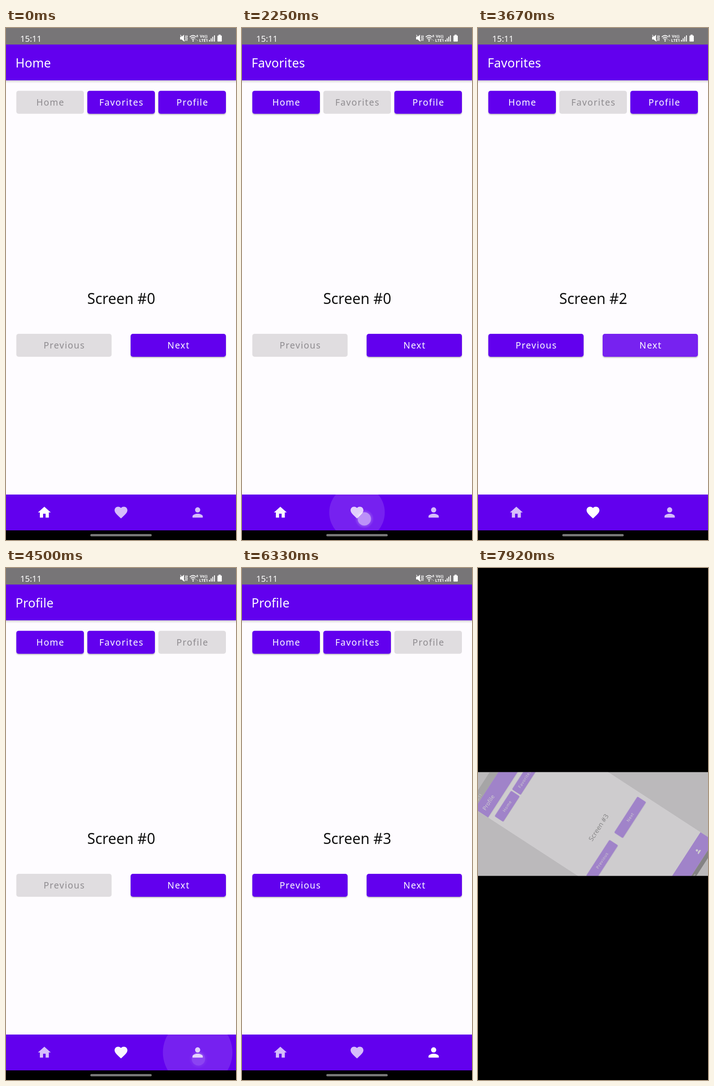
These frames come from a looping animation (502 px wide and 1115 px high, 8000 ms). An HTML page:

```html
<!DOCTYPE html>
<html lang="en">
<head>
<meta charset="utf-8">
<title>Tabs with nested screens</title>
<style>
  html, body { margin: 0; width: 100%; height: 100%; overflow: hidden; background: #000; }
  svg { display: block; width: 502px; height: 1115px; font-family: "Noto Sans", "Open Sans", sans-serif; }
  .btn rect { fill: #6200ee; filter: url(#lift); }
  .btn text { fill: #fff; font-size: 19.5px; letter-spacing: 1.55px; text-anchor: middle; }
  .btn.off rect { fill: #e0dde0; filter: none; }
  .btn.off text { fill: #8e8b8f; }
  .tiny { font-size: 8.6px; font-weight: 700; }
</style>
</head>
<body>
<svg viewBox="0 0 502 1115">
  <defs>
    <filter id="lift" x="-5%" y="-10%" width="110%" height="130%">
      <feDropShadow dx="0" dy="2" stdDeviation="1.3" flood-color="#000" flood-opacity=".25"/>
    </filter>
    <linearGradient id="shade" x2="0" y2="1">
      <stop stop-color="#000" stop-opacity=".17"/>
      <stop offset="1" stop-color="#000" stop-opacity="0"/>
    </linearGradient>
    <radialGradient id="glow">
      <stop offset=".6" stop-color="#fff" stop-opacity=".4"/>
      <stop offset="1" stop-color="#fff" stop-opacity="0"/>
    </radialGradient>
    <clipPath id="band"><rect y="444.5" width="502" height="226"/></clipPath>
    <clipPath id="bar"><rect y="1016" width="502" height="78"/></clipPath>
    <clipPath id="nextBox"><rect x="272" y="666" width="208" height="50" rx="5"/></clipPath>
    <clipPath id="page"><rect width="502" height="1115"/></clipPath>
  </defs>
  <rect id="back" width="502" height="1115"/>
  <g id="frame">
    <g id="phone" clip-path="url(#page)">
      <rect width="502" height="1115" fill="#fefcff"/>
      <rect y="114" width="502" height="6" fill="url(#shade)"/>
      <rect width="502" height="36.5" fill="#777577"/>
      <rect y="36" width="502" height="78" fill="#6200ee"/>
      <g fill="#fff">
        <text x="31" y="29.5" font-size="18.3">15:11</text>
        <path d="M380 19h3.5l5-4.5v15l-5-4.500h-3.500z"/>
        <path d="M380.500 15l9.500 14M391.500 16.500l1.500 2-1.500 2.500 1.500 2.500-1.500 2.500 1 2M394.500 16l1.500 2.500-1.500 2.500 1.500 2.500-1.500 2.500 1 2" fill="none" stroke="#fff" stroke-width="1.3"/>
        <path d="M401 19.500q7.500-6.500 14 0M403.500 22.500q5-4.500 9.500 0M405.800 25.300q2.500-2.300 4.900 0" fill="none" stroke="#fff" stroke-width="1.7"/>
        <circle cx="408.300" cy="28" r="1.500"/>
        <text x="415.500" y="19.500" font-size="7" font-weight="700">6</text>
        <path d="M413 26l1.500-2 1.500 2zM416.500 26.500l1.500 2 1.500-2z" opacity=".6"/>
        <text x="423" y="21" class="tiny">Vo))</text>
        <text x="421.500" y="30" class="tiny">LTE1</text>
        <path d="M443 26h2v3.500h-2zM446.700 22.500h2v7h-2zM450.300 19h2v10.500h-2zM454 16h2v13.500h-2z"/>
        <path d="M464 14.500h4.500v2h1.500q1 0 1 1v11q0 1-1 1h-7.500q-1 0-1-1v-11q0-1 1-1h1.500z"/>
        <text id="title" x="20.700" y="86" font-size="27" letter-spacing=".2"></text>
      </g>
      <g id="buttons"></g>
      <text id="count" x="251.500" y="601" font-size="32" text-anchor="middle" fill="#111"></text>
      <rect y="1016" width="502" height="78" fill="#6200ee"/>
      <g clip-path="url(#bar)"><circle id="navRipple" cy="1055" fill="#fff"/></g>
      <g id="icons" fill="#fff"></g>
      <rect y="1094" width="502" height="21"/>
      <rect x="184" y="1102" width="134" height="5" rx="2.500" fill="#777"/>
      <g id="touch">
        <circle r="21" fill="url(#glow)"/>
        <circle r="14.500" fill="#fff" opacity=".82"/>
      </g>
    </g>
  </g>
</svg>
<script>
const NS = "http://www.w3.org/2000/svg";
const $ = id => document.getElementById(id);
const set = (el, attrs) => { for (const k in attrs) el.setAttribute(k, attrs[k]); return el; };
const add = (parent, tag, attrs) => parent.appendChild(set(document.createElementNS(NS, tag), attrs));
const clamp = x => Math.min(1, Math.max(0, x));
const smooth = x => { x = clamp(x); return x * x * (3 - 2 * x); };
const mix = (a, b, p) => a + (b - a) * p;

const FPS = 12, LOOP = 8000;
const tabs = ["Home", "Favorites", "Profile"];
const tabX = [83.7, 251, 418.300];
const iconPaths = [
  "M10 20v-6h4v6h5v-8h3L12 3 2 12h3v8z",
  "M12 21.350l-1.450-1.320C5.400 15.360 2 12.280 2 8.500 2 5.420 4.420 3 7.500 3c1.740 0 3.410.81 4.500 2.090C13.090 3.810 14.760 3 16.500 3 19.580 3 22 5.420 22 8.500c0 3.780-3.400 6.860-8.550 11.540z",
  "M12 12c2.210 0 4-1.790 4-4s-1.790-4-4-4-4 1.790-4 4 1.790 4 4 4zm0 2c-2.670 0-8 1.340-8 4v2h16v-2c0-2.660-5.330-4-8-4z"
];

// Taps in ticks of 1/12 s; "tab" selects a tab, otherwise the Next button.
const taps = [
  { at: 14, x: 404, y: 702 },
  { at: 25, x: 267, y: 1069, tab: 1 },
  { at: 37, x: 406, y: 702 },
  { at: 40, x: 406, y: 702 },
  { at: 52, x: 420, y: 1069, tab: 2, lead: 0.7 },
  { at: 63, x: 406, y: 702 },
  { at: 66, x: 406, y: 702 },
  { at: 70, x: 406, y: 702 }
];

function button(label, x, y, w) {
  const g = add($("buttons"), "g", { class: "btn" });
  add(g, "rect", { x, y, width: w, height: 50, rx: 5 });
  add(g, "text", { x: x + w / 2 + 0.8, y: y + 32 }).textContent = label;
  return g;
}
const tabButtons = tabs.map((name, i) => button(name, 22.5 + i * 155, 136.7, 147.500));
const prev = button("Previous", 22.5, 666, 208);
button("Next", 272, 666, 208);
const nextClip = add($("buttons"), "g", { "clip-path": "url(#nextBox)" });
const nextRipple = add(nextClip, "circle", { fill: "#fff" });
const icons = iconPaths.map((d, i) => add($("icons"), "path", {
  d, transform: `translate(${tabX[i] - 16.8} 1038.200) scale(1.4)`
}));

function drawApp(tick) {
  let tab = 0, count = 0, last = null;
  const lit = [1, 0, 0];
  for (const tap of taps) {
    const age = tick - tap.at;
    if (age < 0) break;
    last = tap;
    if (tap.tab) {
      const p = smooth((age - 1) / 4);
      lit[tap.tab - 1] = 1 - p;
      lit[tap.tab] = p;
    }
    if (age < 2) continue;
    if (tap.tab) { tab = tap.tab; count = 0; }
    else count++;
  }
  $("title").textContent = tabs[tab];
  $("count").textContent = "Screen #" + count;
  tabButtons.forEach((b, i) => b.classList.toggle("off", i === tab));
  prev.classList.toggle("off", count === 0);
  icons.forEach((icon, i) => set(icon, { opacity: mix(0.74, 1, lit[i]) }));

  const age = last ? tick - last.at + (last.lead || 0) : 99;
  const grow = 1 - (1 - clamp((age - 1) / 2.7)) ** 2;
  const ink = age < 1 ? 0 : clamp((6 - age) / 3);
  const onTab = last && last.tab;
  set($("navRipple"), {
    cx: tabX[onTab || 0], r: mix(25, 84, grow), opacity: onTab ? 0.13 * ink : 0
  });
  if (last && !onTab) set(nextRipple, {
    cx: mix(last.x, 376, grow), cy: mix(last.y, 691, grow), r: mix(35, 118, grow)
  });
  set(nextRipple, { opacity: last && !onTab ? 0.2 * ink : 0 });
  set($("touch"), {
    transform: last ? `translate(${last.x} ${last.y})` : "",
    opacity: 0.77 * clamp((3 - age) / 1.350)
  });
}

// Sideways hold first, then a letterboxed turn that fades out.
function drawTurn(tick) {
  const turning = tick >= 93;
  let transform = "", opacity = 1;
  if (turning) {
    const p = (tick - 92) / 3;
    const angle = mix(-90, -57, p ** 2);
    transform = `translate(251 557.500) rotate(${angle}) scale(${502 / 1115}) translate(-251 -557.500)`;
    opacity = mix(1, 0.29, p);
  } else if (tick >= 91) {
    transform = "matrix(0 -1 1 0 0 502)";
  }
  set($("phone"), { transform, opacity });
  set($("back"), turning
    ? { fill: "#bbb9bb", y: 444.5, height: 226 }
    : { fill: "#fefcff", y: 0, height: 1115 });
  if (turning) set($("frame"), { "clip-path": "url(#band)" });
  else $("frame").removeAttribute("clip-path");
}

let shown = -1;
function draw() {
  const t = performance.now() % LOOP;
  const tick = Math.min(95, Math.floor((t + 5) * FPS / 1000));
  if (tick !== shown) {
    shown = tick;
    drawApp(tick);
    drawTurn(tick);
  }
  requestAnimationFrame(draw);
}
draw();
</script>
</body>
</html>
```
